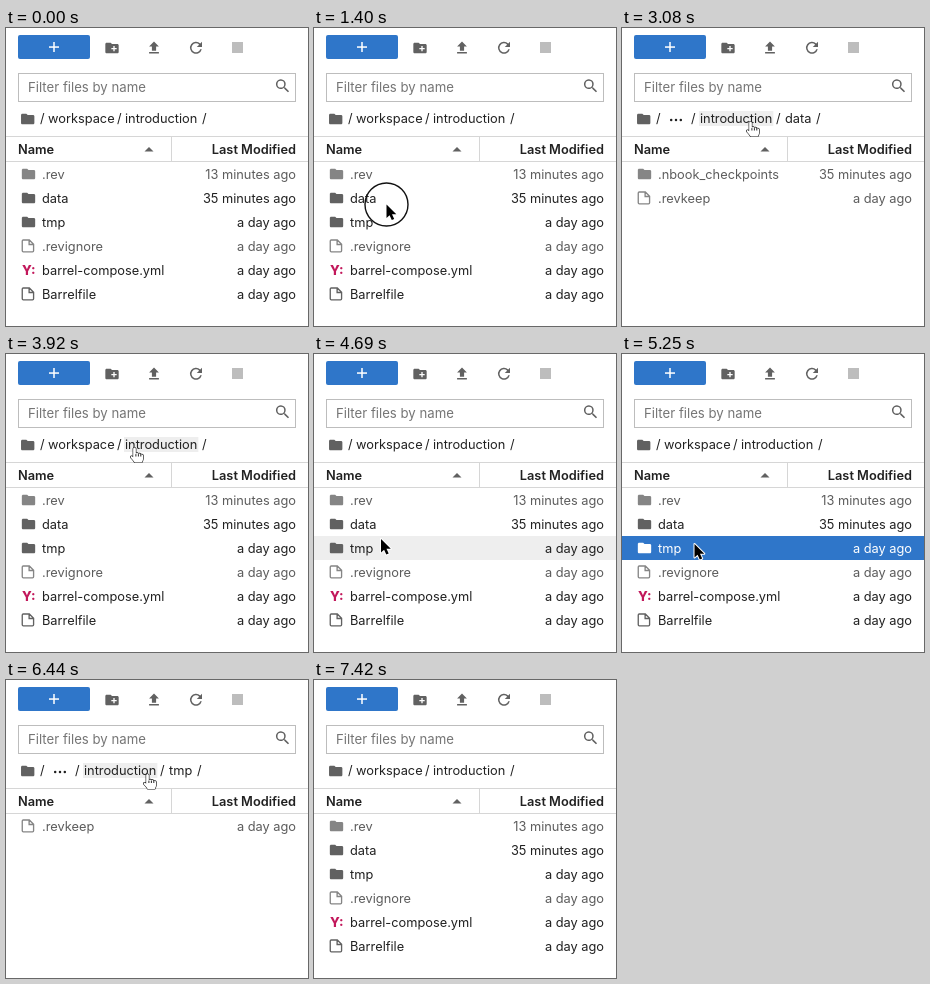
An HTML page with a canvas that plays this animation: 302x298 px, repeating every 8190 ms.

```html
<!DOCTYPE html>
<html lang="en">
<head>
<meta charset="utf-8">
<title>File browser</title>
<style>
html, body { margin: 0; width: 100%; height: 100%; overflow: hidden; background: #fff; }
canvas { display: block; width: 302px; height: 298px; }
</style>
</head>
<body>
<canvas id="stage"></canvas>
<script>
const W = 302, H = 298, LOOP = 8190, STEP = 70;
const canvas = document.getElementById('stage');
const ctx = canvas.getContext('2d');
const dpr = window.devicePixelRatio || 1;
canvas.width = W * dpr;
canvas.height = H * dpr;

const FAMILY = 'Inter, "Liberation Sans", sans-serif';
const INK = '#212121', MUTED = '#5c5c5c', ICON = '#616161', BLUE = '#2f76c9', HOVER = '#eeeeee';

const shapes = {
  folder: new Path2D('M10 4H4c-1.1 0-2 .9-2 2v12c0 1.1.9 2 2 2h16c1.1 0 2-.9 2-2V8c0-1.1-.9-2-2-2h-8z'),
  newFolder: new Path2D('M20 6h-8l-2-2H4c-1.1 0-2 .9-2 2v12c0 1.1.9 2 2 2h16c1.1 0 2-.9 2-2V8c0-1.1-.9-2-2-2zm-1 8h-3v3h-2v-3h-3v-2h3V9h2v3h3z'),
  upload: new Path2D('M9 16h6v-6h4l-7-7-7 7h4zM5 18h14v2H5z'),
  refresh: new Path2D('M17.65 6.35A8 8 0 1 0 19.73 14h-2.08A6 6 0 1 1 16.22 7.78L13 11h7V4z'),
  search: new Path2D('M15.5 14h-.79l-.28-.27A6.5 6.5 0 1 0 13.73 14.43l.27.28v.79l5 4.99L20.49 19zM9.5 14a4.5 4.5 0 1 1 0-9 4.5 4.5 0 0 1 0 9z'),
  file: new Path2D('M5 3.4h8.6l6.1 6.1v9.4q0 1.5-1.5 1.5H5q-1.5 0-1.5-1.5V4.9Q3.5 3.4 5 3.4zM13.3 3.6v6.2h6.2'),
  arrow: new Path2D('M0 0V13.6L3.1 10.7 5.3 15.6 7.7 14.5 5.5 9.8H9.8z'),
  hand: new Path2D('M-1.3 1Q0-.8 1.3 1V6Q2.8 4.8 3.9 6.2 5.3 5.3 6.3 6.9 8.6 6.3 8.7 8.7V11Q8.4 13 7.3 15H.2Q-1.2 12.6-3.5 10.4-4.4 8.6-2.8 8.5L-1.3 9.7z')
};

const row = (name, kind, age, hidden) => ({ name, kind, age, hidden });
const crumb = (label, x) => ({ label, x });
const pages = {
  root: {
    crumbs: [crumb('/', 34), crumb('workspace', 42), crumb('/', 111), crumb('introduction', 119), crumb('/', 196)],
    rows: [
      row('.rev', 'folder', '13 minutes ago', true),
      row('data', 'folder', '35 minutes ago'),
      row('tmp', 'folder', 'a day ago'),
      row('.revignore', 'file', 'a day ago', true),
      row('barrel-compose.yml', 'yaml', 'a day ago'),
      row('Barrelfile', 'file', 'a day ago')
    ]
  },
  data: {
    crumbs: [crumb('/', 34), crumb('/', 69), crumb('introduction', 78), crumb('/', 154), crumb('data', 163), crumb('/', 194)],
    dots: true,
    rows: [
      row('.nbook_checkpoints', 'folder', '35 minutes ago', true),
      row('.revkeep', 'file', 'a day ago', true)
    ]
  },
  tmp: {
    crumbs: [crumb('/', 34), crumb('/', 69), crumb('introduction', 78), crumb('/', 154), crumb('tmp', 163), crumb('/', 191)],
    dots: true,
    rows: [row('.revkeep', 'file', 'a day ago', true)]
  }
};

// Pointer path: time, x, y
const path = [
  [700, 103, 237], [840, 80, 197], [910, 80, 197], [1330, 72.5, 176.5],
  [2380, 72.5, 176.5], [3080, 128.5, 93.5], [4340, 128.5, 93.5],
  [4690, 67, 185], [4760, 72.5, 190], [5740, 72.5, 190], [5810, 70, 187],
  [5950, 84, 162], [6020, 102, 127], [6090, 108, 120], [6160, 108, 120],
  [6440, 141.5, 94], [LOOP, 141.5, 94]
];
// Clicks: from, to, radius
const clicks = [[1400, 1610, 21.5], [3570, 3640, 31], [4900, 5180, 21.5], [6720, 6790, 31]];

const ease = u => u * u * (3 - 2 * u);

function pointerAt(t) {
  if (t < 700 || t >= 7420) return null;
  const i = path.findIndex(p => p[0] > t);
  const [t0, x0, y0] = path[i - 1], [t1, x1, y1] = path[i];
  const u = ease((t - t0) / (t1 - t0));
  return { x: x0 + (x1 - x0) * u, y: y0 + (y1 - y0) * u, alpha: Math.min(1, (7420 - t) / 210) };
}

function pageAt(t) {
  if (t >= 1890 && t < 3850) return pages.data;
  if (t >= 5390 && t < 6930) return pages.tmp;
  return pages.root;
}

function selectedAt(t) {
  if (t >= 1540 && t < 1890) return 1;
  if (t >= 4970 && t < 5390) return 2;
  return -1;
}

function setFont(size = 12.8, weight = 400) {
  ctx.font = `${weight} ${size}px ${FAMILY}`;
}

function text(str, x, y, color = INK, align = 'left') {
  ctx.fillStyle = color;
  ctx.textAlign = align;
  ctx.fillText(str, x, y);
}

function rect(x, y, w, h, color) {
  ctx.fillStyle = color;
  ctx.fillRect(x, y, w, h);
}

function icon(name, x, y, scale, color, line) {
  ctx.save();
  ctx.translate(x, y);
  ctx.scale(scale, scale);
  if (line) {
    ctx.strokeStyle = color;
    ctx.lineWidth = line;
    ctx.stroke(shapes[name]);
  } else {
    ctx.fillStyle = color;
    ctx.fill(shapes[name], 'evenodd');
  }
  ctx.restore();
}

function drawToolbar() {
  ctx.fillStyle = BLUE;
  ctx.beginPath();
  ctx.roundRect(12, 7, 72, 24, 2);
  ctx.fill();
  rect(43, 18.3, 10, 1.5, '#fff');
  rect(47.25, 14, 1.5, 10, '#fff');
  icon('newFolder', 98, 12, 0.667, ICON);
  icon('upload', 139.6, 11.5, 0.7, ICON);
  icon('refresh', 181, 10.8, 0.75, ICON);
  rect(226, 14, 11, 11, '#bdbdbd');

  ctx.strokeStyle = '#bdbdbd';
  ctx.lineWidth = 1;
  ctx.strokeRect(12.5, 45.5, 277, 28);
  setFont(13.2);
  text('Filter files by name', 22, 64, '#757575');
  icon('search', 267.7, 49, 0.75, ICON);
}

function drawCrumbs(page, p) {
  icon('folder', 13.7, 83, 0.667, ICON);
  setFont();
  for (const { label, x } of page.crumbs) {
    const w = ctx.measureText(label).width;
    if (label !== '/' && p && p.y > 82 && p.y < 100 && p.x > x && p.x < x + w) {
      ctx.globalAlpha = p.alpha;
      rect(x - 1, 83, w + 2, 15, HOVER);
      ctx.globalAlpha = 1;
    }
    text(label, x, 95);
  }
  if (page.dots) {
    for (let i = 0; i < 3; i++) {
      ctx.beginPath();
      ctx.arc(49.2 + i * 4.8, 92, 1.25, 0, Math.PI * 2);
      ctx.fill();
    }
  }
}

function drawHeader(p) {
  if (p && p.y >= 109 && p.y < 133) {
    rect(p.x < 166 ? 0 : 166, 109, p.x < 166 ? 165 : 136, 24, HOVER);
  }
  rect(0, 108, W, 1, '#d6d6d6');
  rect(0, 133, W, 1, '#d6d6d6');
  rect(165, 109, 1, 24, '#d6d6d6');
  setFont(12.8, 600);
  text('Name', 12, 126);
  text('Last Modified', 290, 126, INK, 'right');
  ctx.fillStyle = ICON;
  ctx.beginPath();
  ctx.moveTo(138.5, 123.5);
  ctx.lineTo(143, 119);
  ctx.lineTo(147.5, 123.5);
  ctx.fill();
}

function drawRows(page, p, selected) {
  page.rows.forEach(({ name, kind, age, hidden }, i) => {
    const y = 146 + i * 24;
    const on = i === selected;
    if (on) rect(0, y - 12, W, 24, BLUE);
    else if (p && p.y >= y - 12 && p.y < y + 12) rect(0, y - 12, W, 24, HOVER);

    const tint = on ? '#fff' : hidden ? '#858585' : ICON;
    if (kind === 'folder') icon('folder', 14.5, y - 8, 0.667, tint);
    if (kind === 'file') icon('file', 13.8, y - 8.4, 0.7, tint, 1.9);
    if (kind === 'yaml') {
      setFont(13, 800);
      text('Y:', 16, y + 5, '#c2185b');
    }
    const color = on ? '#fff' : hidden ? MUTED : INK;
    setFont();
    text(name, 36, y + 4.6, color);
    text(age, 290, y + 4.6, color, 'right');
  });
}

function drawPointer(p, t) {
  const click = clicks.find(c => t >= c[0] && t < c[1]);
  if (click) {
    ctx.strokeStyle = '#111';
    ctx.lineWidth = 1.4;
    ctx.beginPath();
    ctx.arc(p.x, p.y, click[2], 0, Math.PI * 2);
    ctx.stroke();
  }
  const hand = p.y < 100;
  const shape = hand ? shapes.hand : shapes.arrow;
  ctx.save();
  ctx.globalAlpha = p.alpha;
  ctx.translate(p.x, p.y);
  ctx.lineJoin = 'round';
  ctx.strokeStyle = hand ? '#111' : '#fff';
  ctx.lineWidth = hand ? 1.2 : 2;
  ctx.fillStyle = hand ? '#fff' : '#000';
  ctx.stroke(shape);
  ctx.fill(shape);
  if (hand) {
    ctx.lineWidth = 0.9;
    ctx.beginPath();
    for (const x of [1.4, 3.9, 6.3]) {
      ctx.moveTo(x, 6.6);
      ctx.lineTo(x, 9);
    }
    ctx.stroke();
  }
  ctx.restore();
}

function draw(now) {
  const t = Math.floor((now % LOOP) / STEP) * STEP;
  const p = pointerAt(t);
  const page = pageAt(t);
  const hover = t >= 1890 ? p : null;
  ctx.setTransform(dpr, 0, 0, dpr, 0, 0);
  rect(0, 0, W, H, '#fff');
  drawToolbar();
  drawCrumbs(page, hover);
  drawHeader(hover);
  drawRows(page, hover, selectedAt(t));
  if (p) drawPointer(p, t);
}

const start = performance.now();
function tick() {
  draw(performance.now() - start);
  requestAnimationFrame(tick);
}
tick();
</script>
</body>
</html>
```
